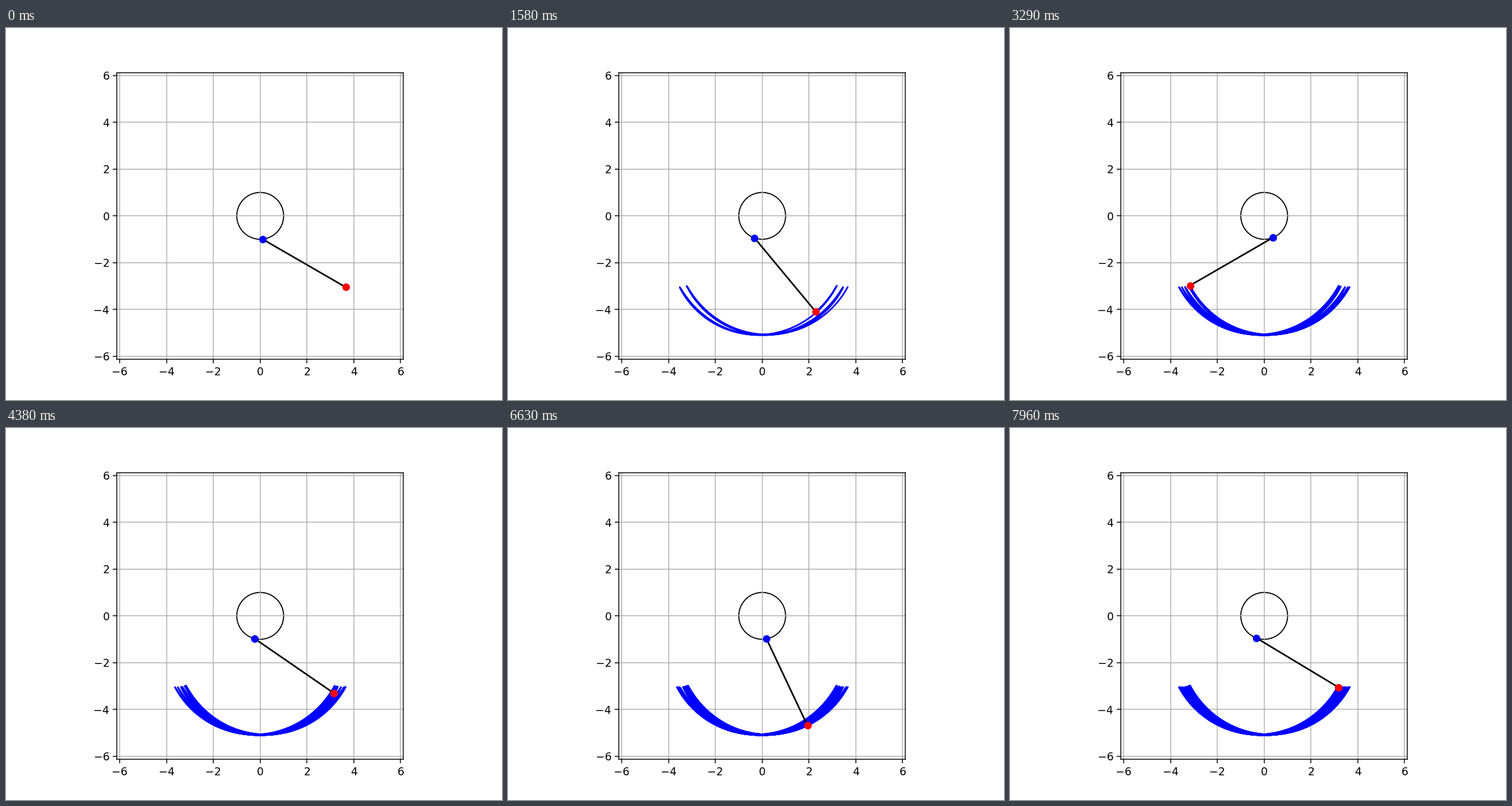
Write a matplotlib script that moves like this. It is 864 px wide and 648 px high and loops after 8 s.

```python
import numpy as np
import matplotlib.pyplot as plt
from matplotlib.animation import FuncAnimation

FRAMES = 192
LOOP_MS = 8000
SUBSTEPS = 12           # trail points per frame

R = 1.0                 # guide circle
L = 4.1                 # rod length
SWING = 0.36285         # rod phase per frame, rad
DRIFT = 0.2183 * SWING  # slow phase of the sliding pivot
DRIFT_AMP = 0.245
RECOIL_AMP = 0.145


def pose(t):
    """Pivot and bob positions at time t, counted in frames."""
    psi = SWING * t
    theta = 1.053 * np.cos(psi) - 0.006 * np.cos(3 * psi)
    phi = DRIFT_AMP * np.cos(DRIFT * t) - RECOIL_AMP * np.cos(psi)
    px, py = R * np.sin(phi), -R * np.cos(phi)
    return px, py, px + L * np.sin(theta), py - L * np.cos(theta)


_, _, trail_x, trail_y = pose(np.arange(FRAMES * SUBSTEPS) / SUBSTEPS)

fig, ax = plt.subplots(figsize=(6.4, 4.8), dpi=135)
lim = 1.2 * (R + L)
ax.set_xlim(-lim, lim)
ax.set_ylim(-lim, lim)
ax.set_aspect("equal")
ax.set_xticks(range(-6, 7, 2))
ax.set_yticks(range(-6, 7, 2))
ax.grid(True)
ax.add_patch(plt.Circle((0, 0), R, fill=False, color="black", lw=1))

trail, = ax.plot([], [], "b-", lw=1.5)
rod, = ax.plot([], [], "k-", lw=1.5)
pivot, = ax.plot([], [], "bo")
bob, = ax.plot([], [], "ro")
artists = (trail, rod, pivot, bob)


def update(i):
    px, py, bx, by = pose(i)
    end = i * SUBSTEPS + 1
    trail.set_data(trail_x[:end], trail_y[:end])
    rod.set_data([px, bx], [py, by])
    pivot.set_data([px], [py])
    bob.set_data([bx], [by])
    return artists


def init():
    return update(0)


anim = FuncAnimation(fig, update, frames=FRAMES, init_func=init,
                     interval=LOOP_MS / FRAMES, repeat=True, repeat_delay=0)
plt.show()
```
